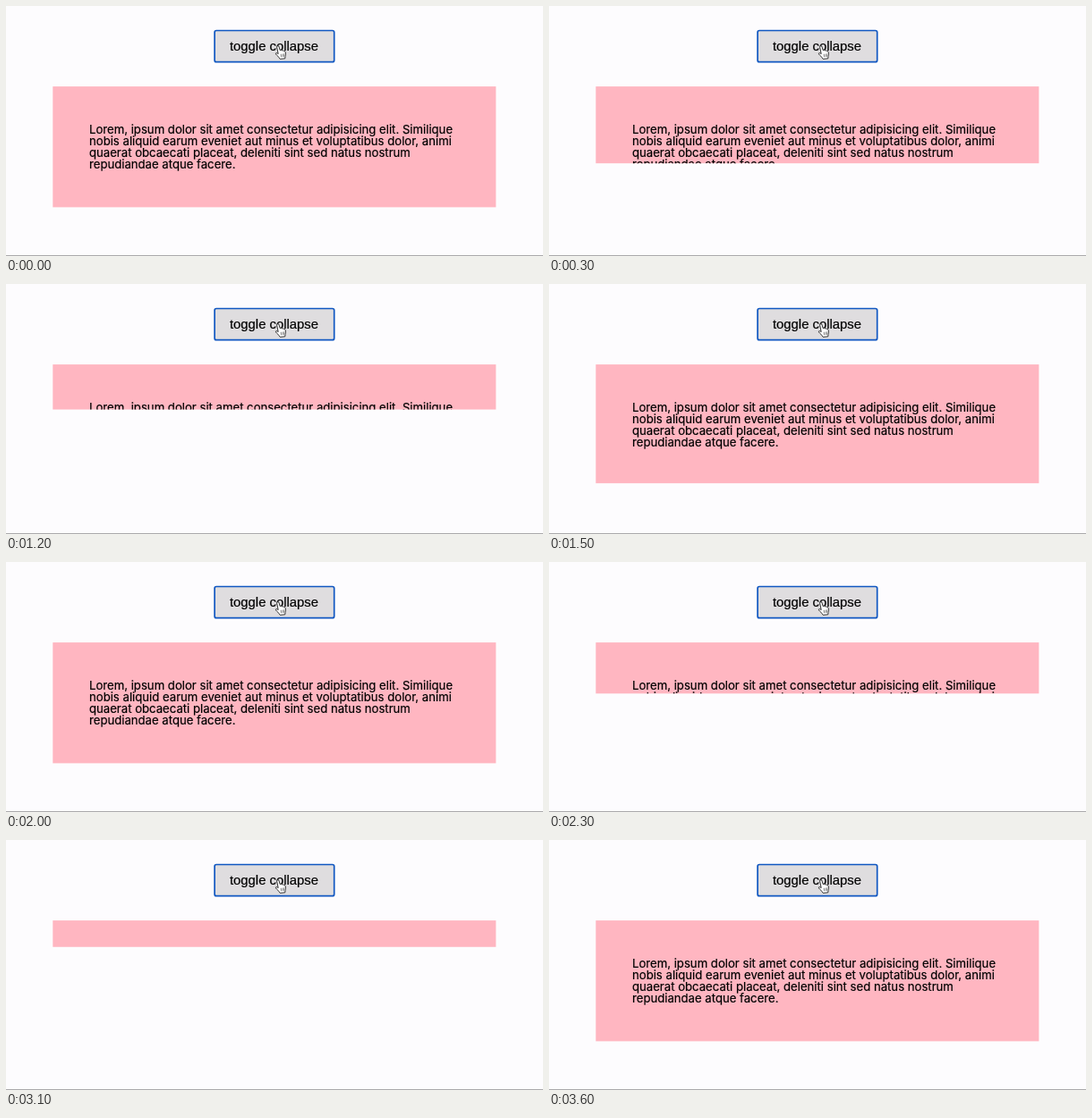
An HTML page for the animation above (4200 ms loop, 600 by 280 pixels).

```html
<!DOCTYPE html>
<html lang="en">
<head>
<meta charset="utf-8">
<title>Toggle collapse</title>
<style>
  html, body { margin: 0; width: 100%; height: 100%; overflow: hidden; background: #fdfcfe; }
  svg { display: block; }
  text { fill: #000; stroke: #000; stroke-width: .2px; }
  .toggle rect { fill: #dfdddf; stroke: #1057c1; stroke-width: 1.7px; }
  .toggle text { font: 14.85px "Liberation Sans", Arial, sans-serif; text-anchor: middle; }
  .panel text { font: 13.15px Inter, sans-serif; }
  .fill { fill: #ffb6c1; }
  .rule { fill: #aaa9ab; }
  .hand { fill: #fff; stroke: #333; stroke-linejoin: round; }
  .hand .gaps { fill: none; stroke: #555; stroke-width: .7px; }
</style>
</head>
<body>
<svg width="600" height="280" viewBox="0 0 600 280">
  <defs>
    <clipPath id="window"><rect class="slide" x="52.3" y="90.1" width="495.1" height="135.3"/></clipPath>
  </defs>
  <g class="toggle">
    <rect x="233.1" y="27.5" width="133.6" height="35.2" rx="2"/>
    <text x="299.5" y="50">toggle collapse</text>
  </g>
  <g class="panel">
    <rect class="slide fill" x="52.3" y="90.1" width="495.1" height="135.3"/>
    <g clip-path="url(#window)">
      <text x="93" y="142.8">Lorem, ipsum dolor sit amet consectetur adipisicing elit. Similique</text>
      <text x="93" y="156">nobis aliquid earum eveniet aut minus et voluptatibus dolor, animi</text>
      <text x="93" y="169.2">quaerat obcaecati placeat, deleniti sint sed natus nostrum</text>
      <text x="93" y="182.4">repudiandae atque facere.</text>
    </g>
  </g>
  <g class="hand" transform="translate(299.6 43.2)">
    <path d="M4.6 10.4 3.1 3.2Q2.9 1.6 4.1 1.5 5.2 1.4 5.6 2.9L6.5 6.3Q7.8 5.5 8.6 6.7 9.9 6 10.6 7.2 12.2 6.7 12.6 8.6 13.2 11 12.4 13L12.2 15.6 6.6 16.2Q5.8 14.3 3.2 12.2 1.1 10.3 2 9.6 3 8.9 4.6 10.4Z"/>
    <path class="gaps" d="M7.4 10.6 7.9 14M9.3 10.4 9.6 13.8M11 10.2V13.6"/>
  </g>
  <rect class="rule" y="279" width="600" height="1"/>
</svg>
<script>
  const LOOP = 4200, TICK = 100, SLIDE = 500, FULL = 135.3;
  // start time of each slide and the share of the height it ends on
  const slides = [[185, 0], [1083, 1], [2133, 0], [3017, 1]];
  const rects = document.querySelectorAll('.slide');

  const bezier = (a, b, u) => 3 * (1 - u) ** 2 * u * a + 3 * (1 - u) * u * u * b + u ** 3;

  // CSS "ease": cubic-bezier(.25, .1, .25, 1)
  function ease(x) {
    let lo = 0, hi = 1;
    for (let i = 0; i < 24; i++) {
      const mid = (lo + hi) / 2;
      if (bezier(.25, .25, mid) < x) lo = mid; else hi = mid;
    }
    return bezier(.1, 1, lo);
  }

  function openness(t) {
    let open = 1;
    for (const [start, end] of slides) {
      const x = Math.min(1, Math.max(0, (t - start) / SLIDE));
      if (x > 0) open += (end - open) * ease(x);
    }
    return open;
  }

  // the picture advances ten times a second
  function draw() {
    const t = Math.floor(performance.now() % LOOP / TICK) * TICK;
    const height = (FULL * openness(t)).toFixed(2);
    for (const rect of rects) rect.setAttribute('height', height);
    requestAnimationFrame(draw);
  }
  draw();
</script>
</body>
</html>
```
